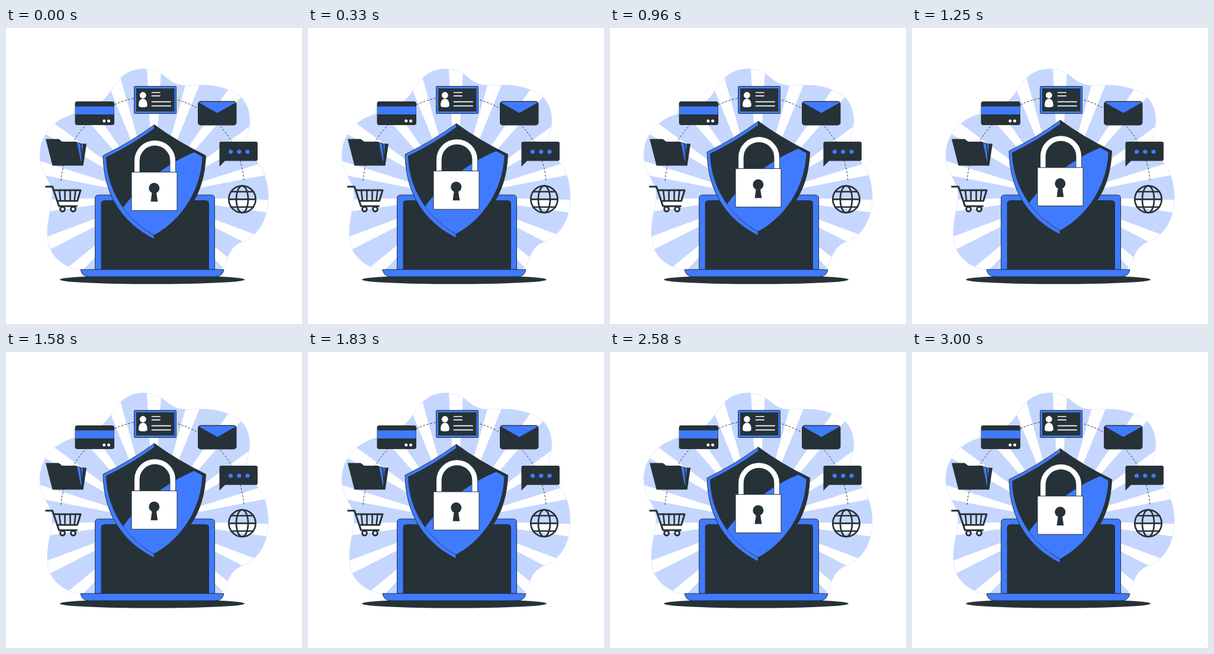
Write an HTML page that moves like this. It is 500 by 500 pixels and loops after 3040 ms.

```html
<!DOCTYPE html>
<html lang="en">
<head>
<meta charset="utf-8">
<title>Secure laptop</title>
<style>
  html, body { margin: 0; width: 100%; height: 100%; overflow: hidden; background: #fff; }
  svg { display: block; width: 100%; height: 100%; }
  .dark { fill: #263238; }
  .blue { fill: #407bff; }
  .pale { fill: #c5d7ff; }
  .white { fill: #fff; }
  .edge { stroke: #263238; stroke-width: 1; stroke-linejoin: round; }
  .line { fill: none; stroke: #263238; stroke-linecap: round; stroke-linejoin: round; }
</style>
</head>
<body>
<svg viewBox="0 0 500 500">
  <defs>
    <clipPath id="blob">
      <path id="blobShape" d="M232 69C254 69 264 78 275 87C286 96 297 97 312 97C340 95 360 97 382 107
        C405 117 412 138 412 158C411 173 405 182 406 197C407 212 421 219 430 234
        C440 250 444 271 443 293C441 321 430 347 402 360C386 365 379 375 374 389
        C370 400 368 406 358 409H125C102 405 80 391 73 369C66 345 72 321 77 296
        C80 274 75 264 66 249C59 237 57 226 57 213C58 188 71 167 93 154
        C113 143 133 141 151 131C173 119 178 101 191 87C202 75 216 69 232 69Z"/>
    </clipPath>
    <clipPath id="face">
      <path d="M169.500 218.500L250 160L331.500 217.500C329 284 286 331 250 349.500C214 331 171 284 169.500 218.500Z"/>
    </clipPath>
  </defs>

  <g clip-path="url(#blob)">
    <use href="#blobShape" class="pale"/>
    <path id="rays" class="white"/>
  </g>
  <use href="#blobShape" fill="none" stroke="#c5d7ff" stroke-width=".5"/>

  <path class="line" d="M93 258A155 155 0 0 1 402 258" stroke-dasharray="3.5 2.6" style="stroke-linecap:butt"/>

  <!-- identity card -->
  <rect class="blue edge" x="216.500" y="98.500" width="71" height="46" rx="1"/>
  <rect class="dark" x="220" y="102" width="64.500" height="39"/>
  <circle class="white" cx="231.3" cy="113.5" r="5.4"/>
  <path class="white" d="M224 131C224 123 227 119.500 231.300 119.500S238.700 123 238.700 131Q238.700 134 231.300 134T224 131Z"/>
  <path class="line" style="stroke:#fff" stroke-width="1.7" d="M246.500 109H260M246.500 114.700H260M246.500 124.700H278M246.500 131.700H278"/>

  <!-- bank card -->
  <rect class="dark" x="116.500" y="124" width="66.500" height="40" rx="4"/>
  <rect class="blue" x="117" y="132.500" width="65.500" height="13.500"/>
  <circle class="white" cx="165.800" cy="157" r="2.500"/>
  <circle class="white" cx="173.500" cy="157" r="2.500"/>

  <!-- envelope -->
  <rect class="dark" x="324" y="123.500" width="65.500" height="41" rx="5"/>
  <path class="blue" d="M326 126Q327 125 329 125H385Q387 125 388 126L357 143.500Z"/>

  <!-- chat bubble -->
  <path class="dark" d="M364 192H422Q425 192 425 195V221.500Q425 224.500 422 224.500H370L360.500 234V195Q360.500 192 364 192Z"/>
  <g class="blue">
    <circle cx="379.500" cy="209" r="3.600"/>
    <circle cx="393.800" cy="209" r="3.600"/>
    <circle cx="408" cy="209" r="3.600"/>
  </g>

  <!-- folder -->
  <path class="dark" d="M67 187.500H89L95 192H119L121 195.500H136L130.500 232.500H78.500Z"/>
  <path class="blue edge" stroke-width=".7" d="M119.500 193.500L125.500 194.500L128 222L126.500 228Z"/>
  <path class="blue edge" stroke-width=".7" d="M126.500 196H130.500L128.300 217Z"/>

  <!-- cart -->
  <g class="line" stroke-width="3">
    <path d="M67.500 268H78.500L89.500 301H119.500M81 274H126L120.500 292H86.500"/>
    <path stroke-width="2.600" d="M90 274L92 292M99.500 274V292M108.500 274V292M117.500 274L115.500 292"/>
    <circle class="white" cx="95.500" cy="306" r="3.900"/>
    <circle class="white" cx="113.500" cy="306" r="3.900"/>
  </g>

  <!-- globe -->
  <g class="line" stroke-width="2.700">
    <circle cx="399" cy="289.300" r="22.700"/>
    <ellipse cx="399" cy="289.300" rx="10" ry="22.700"/>
    <path d="M376.500 289.300H421.500M380 276.500H418M380 302.500H418"/>
  </g>

  <!-- laptop -->
  <ellipse class="dark" cx="247" cy="425" rx="156" ry="7.600"/>
  <path class="blue edge" d="M150.500 408V288Q150.500 282 156.500 282H346.500Q352.500 282 352.500 288V408Z"/>
  <path class="dark" d="M160.500 408V297Q160.500 291 166.500 291H337Q343 291 343 297V408Z"/>
  <path class="blue edge" d="M126 408H368Q366 420 354 420H140Q128 420 126 408Z"/>

  <g id="shield">
    <path class="blue edge" d="M250.500 163.500Q212 192 164 215.500C165 285 199 331 250 356.500V349L310 230Z"/>
    <path class="dark edge" d="M250.500 163.500Q289 192 337.500 215.500C335 284 303 325 250 350C214 331 171 284 169.500 218.500Q212 198 250.500 170Z"/>
    <path class="blue" clip-path="url(#face)" d="M180 325L199 302C220 272 268 230 318 210L340 222V360H200Z"/>
    <g class="line">
      <path stroke-width="10" d="M221.300 245V224.500A30.200 30.200 0 0 1 281.700 224.500V245"/>
      <path stroke-width="8.600" style="stroke:#fff" d="M221.300 245V224.500A30.200 30.200 0 0 1 281.700 224.500V245"/>
    </g>
    <rect class="white edge" x="212" y="243.500" width="77" height="64.800"/>
    <circle class="dark" cx="250.300" cy="270.500" r="9"/>
    <path class="dark" d="M247 275H253.500L256.300 293.200H244.500Z"/>
  </g>
</svg>
<script>
  const LOOP = 3040, STEP = 1000 / 24, LIFT = 9.4;
  const RAYS = 19, HALF_WIDTH = 3.2;
  const shield = document.getElementById("shield");

  // Point far out from the fan's centre, angle clockwise from straight up.
  const rim = angle => {
    const a = angle * Math.PI / 180;
    return `${250 + 320 * Math.sin(a)} ${285 - 320 * Math.cos(a)}`;
  };
  const ray = (_, i) => {
    const middle = i * 360 / RAYS;
    return `M250 285L${rim(middle - HALF_WIDTH)}L${rim(middle + HALF_WIDTH)}Z`;
  };
  document.getElementById("rays").setAttribute("d", Array.from({ length: RAYS }, ray).join(""));

  // The shield rises and sinks at constant speed, 24 poses a second.
  function draw(now) {
    const time = Math.floor((now % LOOP + 5) / STEP) * STEP % LOOP;
    const rise = 1 - Math.abs(1 - 2 * time / LOOP);
    shield.setAttribute("transform", `translate(0 ${-LIFT * rise})`);
  }
  function tick(now) {
    draw(now);
    requestAnimationFrame(tick);
  }
  draw(0);
  requestAnimationFrame(tick);
</script>
</body>
</html>
```
